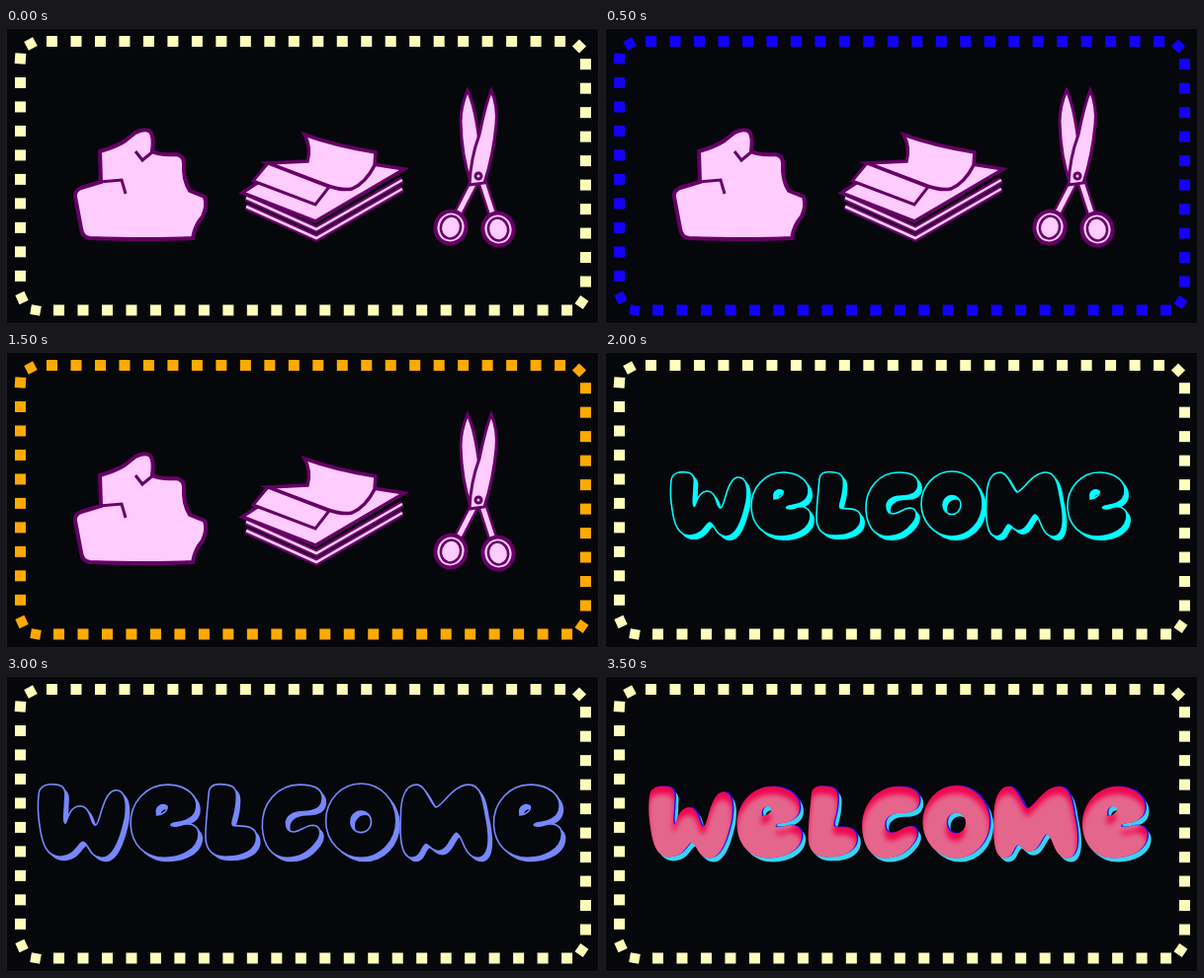
An HTML page with a canvas for the animation above (4000 ms loop, 600 px wide and 300 px high).

```html
<!DOCTYPE html>
<html lang="en">
<head>
<meta charset="utf-8">
<title>Welcome sign</title>
<style>
html, body { margin: 0; width: 600px; height: 300px; overflow: hidden; background: #05070b; }
canvas { display: block; }
</style>
</head>
<body>
<canvas id="stage" width="600" height="300"></canvas>
<script>
const ctx = document.getElementById('stage').getContext('2d');
const STEP = 500;
const BACK = '#05070b', CREAM = '#ffffbb', PINK = '#ffccff', PLUM = '#660066';
const bulbColours = [CREAM, '#1400ff', '#ff1493', '#ffaa00'];

// Each word pose: colour and bounding box
const poses = [
  { colour: '#00ffff', box: [66, 121, 532, 192] },
  { colour: '#3cc4ff', box: [50, 114, 550, 191] },
  { colour: '#7788ff', box: [32, 109, 567, 190] },
  { colour: '#38d4f4', box: [44, 111, 553, 190], puffy: true }
];

const letterE = 'M148 158C147 138 162 121 182 122C198 123 207 132 206 142C205 153 194 155 186 156C180 158 186 160 192 158C200 155 208 158 208 166C208 180 192 187 178 187C160 187 149 175 148 158ZM171 147C170 142 175 138 180 141C181 145 176 149 171 149Z';
const word = new Path2D();
[
  'M67 130C68 122 76 121 83 122C90 123 91 128 90 136C90 146 88 154 90 156C92 158 92 142 103 141C114 141 112 158 117 158C121 158 123 129 134 127C144 126 145 140 143 152C140 166 134 188 122 187C111 186 111 174 106 173C102 173 100 185 87 186C74 187 70 174 68 160C66 148 66 138 67 130Z',
  letterE,
  'M217 128C218 121 226 121 232 122C242 123 242 130 241 139C240 150 236 156 238 158C240 160 259 155 259 169C259 182 244 186 234 186C220 187 214 180 214 168C214 156 216 140 217 128Z',
  'M264 160C263 138 278 122 297 122C310 122 317 126 317 134C317 143 310 146 300 146C290 146 285 151 285 156C285 162 288 164 292 164C299 163 302 158 309 158C317 159 316 168 311 174C304 183 296 187 286 187C272 187 265 176 264 160Z',
  'M320 154A31 33 0 0 1 382 154A31 33 0 0 1 320 154ZM342 155A9 9.5 0 0 1 360 155A9 9.5 0 0 1 342 155Z',
  'M386 150C386 134 390 122 400 122C408 122 412 139 417 142C423 141 432 122 446 122C458 122 459 140 461 150C464 164 466 185 455 187C441 188 441 166 435 165C431 166 428 181 419 181C413 181 411 175 408 175C404 177 404 187 396 187C386 187 385 168 386 150Z'
].forEach(d => word.addPath(new Path2D(d)));
word.addPath(new Path2D(letterE), new DOMMatrix().translate(320, 0));

function shape(d, width = 4, fill = PINK, stroke = PLUM) {
  const path = new Path2D(d);
  if (fill) { ctx.fillStyle = fill; ctx.fill(path); }
  ctx.strokeStyle = stroke;
  ctx.lineWidth = width;
  ctx.stroke(path);
}

function bulb(x, y, angle = 0, size = 11) {
  ctx.save();
  ctx.translate(x, y);
  ctx.rotate(angle * Math.PI / 180);
  ctx.fillRect(-size / 2, -size / 2, size, size);
  ctx.restore();
}

function drawBulbs(colour) {
  const gap = 24.48;
  ctx.fillStyle = colour;
  for (let i = 0; i < 22; i++) {
    bulb(46.5 + i * gap, 13.5);
    bulb(53.5 + i * gap, 286);
  }
  for (let i = 0; i < 10; i++) {
    bulb(14.5, 31 + i * gap, i ? 0 : 4);
    bulb(586.5, 36.7 + i * gap);
  }
  bulb(25, 16, -28, 10);
  bulb(580, 18.5, 45, 10);
  bulb(582.5, 278, 35, 10);
  bulb(30, 286, 10, 10);
  bulb(16, 273.5, 65, 10);
}

function drawRock() {
  shape('M95 125Q112 120 121 114L131 106Q140 101 146 105Q150 110 148 125Q155 129 172 128Q180 129 180 137Q179 154 186 165L201 171Q204 180 199 191Q191 200 189 213Q145 215 85 213Q77 212 76 203L70 171Q69 165 76 162L96 156Z');
  shape('M94 156L117 154L121 168M131 125L138 134L149 125', 3, null);
}

function drawPaper() {
  for (const y of [17, 8]) {
    const edge = `M243 ${164 + y}L314 ${196 + y}L401 ${146 + y}`;
    shape(edge, 7, null);
    shape(edge, 2.5, null, PINK);
  }
  shape('M262 152L239 167L313 196L403 143L365 137Z', 3.5);
  shape('M265 137L305 135Q309 121 302 108Q332 119 374 126L373 139Q364 157 350 163Q340 165 326 160Z', 3.5);
  shape('M265 137L250 155L313 179L327 161Z', 3);
}

function drawScissors() {
  const shanks = 'M474 156L457 189M482 156L493 190';
  shape(shanks, 10, null);
  shape(shanks, 5, null, PINK);
  shape('M467 63Q460 80 460 95Q461 130 470 156L484 154L478 108Q474 78 467 63Z', 3);
  shape('M491 63Q498 80 496 98Q493 130 484 157L469 159Q470 132 479 108Q485 78 491 63Z', 3);
  for (const [x, y, tilt] of [[450, 202, 0.25], [498, 204, -0.25]]) {
    for (const [rx, ry, width] of [[15.5, 16.5, 4], [10, 11.5, 2.5]]) {
      const ring = new Path2D();
      ring.ellipse(x, y, rx, ry, tilt, 0, 7);
      shape(ring, width);
    }
  }
  const pivot = new Path2D();
  pivot.arc(478, 150, 3, 0, 7);
  shape(pivot, 3);
}

function fillShifted(path, dx, dy, colour) {
  ctx.save();
  ctx.translate(dx, dy);
  ctx.fillStyle = colour;
  ctx.fill(path, 'evenodd');
  ctx.restore();
}

function drawWord({ colour, box: [x0, y0, x1, y1], puffy }) {
  const path = new Path2D();
  const fit = new DOMMatrix().translate(x0, y0)
    .scale((x1 - x0) / 466, (y1 - y0) / 71).translate(-66, -121);
  path.addPath(word, fit);

  for (let i = 1; i <= 4; i++) fillShifted(path, i, i, colour);
  if (!puffy) {
    fillShifted(path, 0, 0, BACK);
    shape(path, 1.6, null, colour);
    return;
  }
  fillShifted(path, 1.5, -0.5, '#1c10f0');
  fillShifted(path, 0, 0, '#f00850');
  ctx.save();
  ctx.clip(path, 'evenodd');
  ctx.filter = 'blur(2.5px)';
  fillShifted(path, -0.5, 8, '#e4668c');
  ctx.restore();
}

function draw(now) {
  const step = Math.floor(now % (8 * STEP) / STEP);
  ctx.fillStyle = BACK;
  ctx.fillRect(0, 0, 600, 300);
  shape('M.5 .5H599.5V299.5H.5Z', 1, null, '#1c1c20');
  drawBulbs(bulbColours[step] || CREAM);
  if (step < 4) {
    drawRock();
    drawPaper();
    drawScissors();
  } else {
    drawWord(poses[step - 4]);
  }
  requestAnimationFrame(draw);
}
requestAnimationFrame(draw);
</script>
</body>
</html>
```
